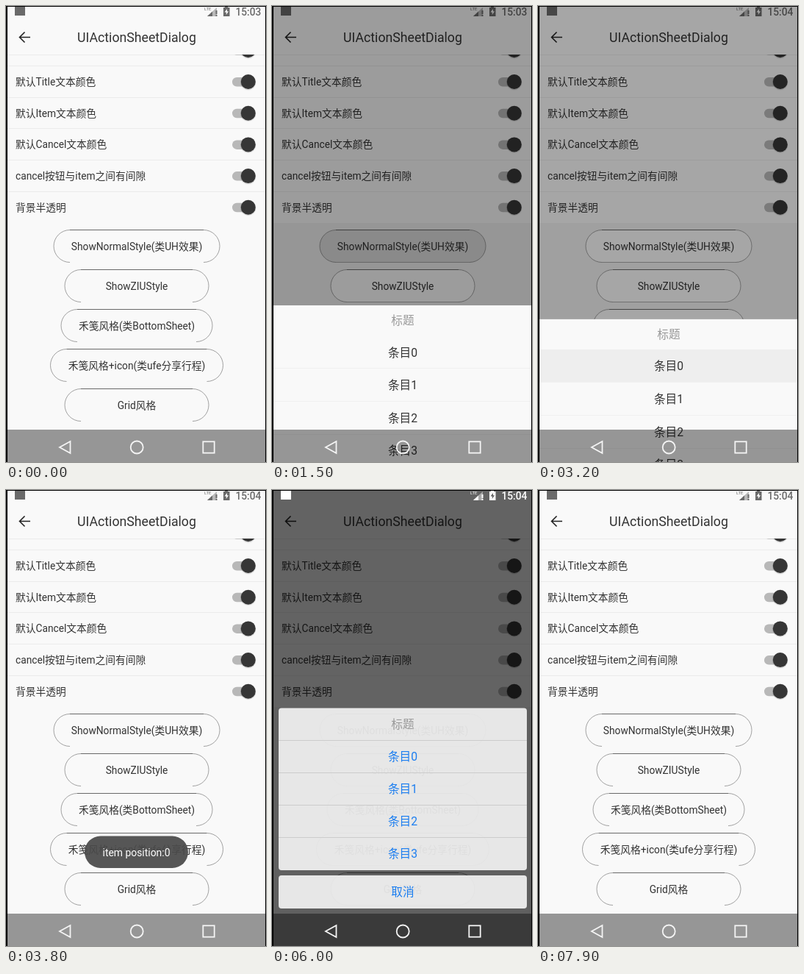
An HTML page that plays this animation: 354 by 620 pixels, repeating every 8 s.

```html
<!DOCTYPE html>
<html lang="zh-CN">
<head>
<meta charset="utf-8">
<title>UIActionSheetDialog</title>
<style>
  html, body { margin: 0; width: 100%; height: 100%; overflow: hidden; background: #000; }
  svg { display: block; width: 100%; height: 100%; }
  text { font-family: Roboto, "Noto Sans CJK SC", "Noto Sans CJK", sans-serif; font-size: 13.75px; fill: #333; }
  .mid { text-anchor: middle; }
  .entry { font-size: 15.7px; }
  .hint { fill: #999; }
  .blue { fill: #1c7ef0; }
  .pill { fill: #f9f9f9; }
  .side { fill: none; stroke: #666; stroke-width: .6; }
  .top { stroke: #444; stroke-width: .8; }
  .bottom { stroke: #777; stroke-width: .6; }
  .rule { stroke: #ebebeb; }
  .nav { fill: none; stroke: #f4f4f4; stroke-width: 1.8; }
</style>
</head>
<body>
<svg viewBox="0 0 354 620">
  <defs>
    <clipPath id="screen"><rect x="2" y="1" width="351" height="619"/></clipPath>
    <clipPath id="list"><rect x="2" y="66" width="351" height="240"/></clipPath>
    <clipPath id="pill0"><rect x="65" y="304.5" width="226" height="44" rx="22"/></clipPath>
    <clipPath id="pill1"><rect x="80" y="358.5" width="196" height="44" rx="22"/></clipPath>
  </defs>
  <g clip-path="url(#screen)">
    <rect width="354" height="620" fill="#f9f9f9"/>
    <rect id="ground" y="295" width="354" height="325" fill="#f0f0f0"/>
    <path d="M33 42.5H19M25.5 35.5L18.5 42.5L25.5 49.5" fill="none" stroke="#222" stroke-width="1.6"/>
    <text class="mid" x="178" y="49" style="font-size:17.7px">UIActionSheetDialog</text>
    <path class="rule" d="M2 66.5H353"/>
    <g id="rows" clip-path="url(#list)"></g>
    <g id="buttons"></g>
    <g id="bottoms"></g>
    <g id="toast">
      <rect x="107" y="470.5" width="141" height="43.5" rx="21.7" fill="#4a4a4a" opacity=".93"/>
      <text class="mid" x="177.5" y="497.5" style="fill:#fff;font-size:13.9px">item position:0</text>
    </g>
    <rect id="dim" width="354" height="620"/>
    <g id="plainSheet"></g>
    <g id="cardSheet"></g>
    <rect y="576" width="354" height="44" opacity=".4"/>
    <g class="nav">
      <path d="M87.5 592V608L73 600Z"/>
      <circle cx="178.2" cy="600" r="8.5"/>
      <rect x="268.3" y="592.3" width="15.4" height="15.4"/>
    </g>
    <g id="status">
      <rect x="12" y="1" width="14" height="12"/>
      <text x="270" y="6" style="font-size:6px;fill:inherit">LTE</text>
      <path d="M274 14L287 2V14Z" opacity=".45"/>
      <path d="M274 14L281 7.5V14Z"/>
      <path d="M285.5 6H287.5V11H285.5ZM285.5 12H287.5V14H285.5Z"/>
      <path fill-rule="evenodd" d="M296 2H298V0H302V2H304.5V14H296ZM301 4L297.5 8.6H299.8V12L303 7.3H301Z"/>
      <text id="clock" x="312.4" y="13" style="font-size:13.8px;font-weight:500;fill:inherit"></text>
    </g>
  </g>
</svg>
<script>
const $ = id => document.getElementById(id);
const clamp = x => Math.min(1, Math.max(0, x));
const ramp = (t, from, to) => clamp((t - from) / (to - from));
const label = (text, y, cls) => `<text class="mid ${cls}" x="178" y="${y}">${text}</text>`;

const rowTexts = ['', '默认Title文本颜色', '默认Item文本颜色', '默认Cancel文本颜色',
  'cancel按钮与item之间有间隙', '背景半透明'];
$('rows').innerHTML = rowTexts.map((text, i) => {
  const y = 60.3 + i * 42.7;
  const line = i < 5 ? `<path class="rule" d="M2 ${Math.round(y + 20.7) + .5}H353"/>` : '';
  return `${line}<text x="13" y="${y + 5}">${text}</text>
    <rect x="308" y="${y - 6}" width="27" height="12.5" rx="6.2" fill="#b8b8b8"/>
    <circle cx="329.8" cy="${y + .8}" r="10.6" opacity=".12"/>
    <circle cx="329.8" cy="${y}" r="10" fill="#363636"/>`;
}).join('');

const buttons = [['ShowNormalStyle(类UH效果)', 226], ['ShowZIUStyle', 196], ['禾笺风格(类BottomSheet)', 206],
  ['禾笺风格+icon(类ufe分享行程)', 235], ['Grid风格', 196]]
  .map(([text, width], i) => ({ text, width, y: 304.5 + i * 54, left: 200 - width / 2, right: 156 + width / 2 }));
$('buttons').innerHTML = buttons.map(({ text, width, y, left, right }, i) => {
  const ripple = i < 2 ? `<g clip-path="url(#pill${i})">
    <rect id="tint${i}" x="60" y="${y}" width="240" height="45"/>
    <circle id="ripple${i}" cx="168" cy="${y + 22}" opacity=".065"/></g>` : '';
  return `<rect class="pill" x="${left - 22}" y="${y}" width="${width}" height="44" rx="22"/>${ripple}
    <path class="side" d="M${left} ${y + 44}a22 22 0 0 1 0 -44M${right} ${y}a22 22 0 0 1 0 44"/>
    <path class="top" d="M${left} ${y}H${right}"/>${label(text, y + 27, '')}`;
}).join('');
$('bottoms').innerHTML = buttons.map(({ y, left, right }) =>
  `<path class="bottom" d="M${left} ${y + 44}H${right}"/>`).join('');

const entries = [0, 1, 2, 3].map(i => '条目' + i);
$('plainSheet').innerHTML = `<rect y="305" width="354" height="272" fill="#f9f9f9"/>
  <rect id="chosen" y="346" width="354" height="44" fill="#eee"/>
  <path d="M2 390.5H353M2 435.5H353M2 480.5H353" stroke="#f0f0f0"/>
  <rect y="524.5" width="354" height="7" fill="#e5e5e5"/>` +
  label('标题', 331.3, 'entry hint') +
  entries.map((text, i) => label(text, 374.5 + i * 44.6, 'entry')).join('') +
  label('取消', 560, 'entry');
$('cardSheet').innerHTML = `<g fill="#f9f9f9" opacity=".885">
    <rect x="9" y="296.5" width="338" height="220.5" rx="4"/>
    <rect x="9" y="524" width="338" height="45" rx="4"/></g>
  <path d="M9 340.5H347M9 384.5H347M9 428.5H347M9 472.5H347" stroke="#ccc"/>` +
  label('标题', 324, 'entry hint') +
  entries.map((text, i) => label(text, 368 + i * 44.1, 'entry blue')).join('') +
  label('取消', 552, 'entry blue');

// Decelerating entry, accelerating exit.
function shown(t, open, opened, close, closed) {
  return 1 - (1 - ramp(t, open, opened)) ** 2 - ramp(t, close, closed) ** 2;
}

function slide(id, progress, height) {
  $(id).setAttribute('transform', `translate(0 ${(1 - progress) * height})`);
  $(id).style.display = progress > 0 ? '' : 'none';
}

function press(i, t, start, grow, end, until) {
  const on = t >= start && t < until;
  $('tint' + i).setAttribute('opacity', on ? .05 * ramp(t, start - 100, start + 200) : 0);
  $('ripple' + i).setAttribute('r', on ? 125 * ramp(t, grow, end) : 0);
}

function draw(t) {
  const plain = shown(t, 1345, 1745, 3000, 3300);
  const card = shown(t, 5600, 6000, 6900, 7100);
  const open = Math.max(plain, card);
  const dim = .6 * open;

  slide('plainSheet', plain, 272);
  slide('cardSheet', card, 280);
  $('dim').setAttribute('opacity', dim);
  $('chosen').setAttribute('opacity', t >= 1800 ? 1 : 0);
  const active = (t >= 1200 && t < 3300) || (t >= 4800 && t < 7100) ? 1 : 0;
  $('ground').setAttribute('opacity', active);
  $('bottoms').setAttribute('opacity', active);
  press(0, t, 1200, 1100, 1400, 2000);
  press(1, t, 4400, 4700, 5550, 6000);
  $('toast').setAttribute('opacity', ramp(t, 3400, 3800) - ramp(t, 4900, 5300));

  const light = ramp(open, .65, 1);
  const shade = Math.round(106 * (1 - dim) * (1 - light) + 255 * light);
  $('status').setAttribute('fill', `rgb(${shade},${shade},${shade})`);
  $('clock').textContent = t < 2000 ? '15:03' : '15:04';
}

// The picture advances ten times a second.
const startTime = performance.now();
function tick() {
  const t = (performance.now() - startTime) % 8000;
  draw(Math.floor(t / 100) * 100);
  requestAnimationFrame(tick);
}
tick();
</script>
</body>
</html>
```
